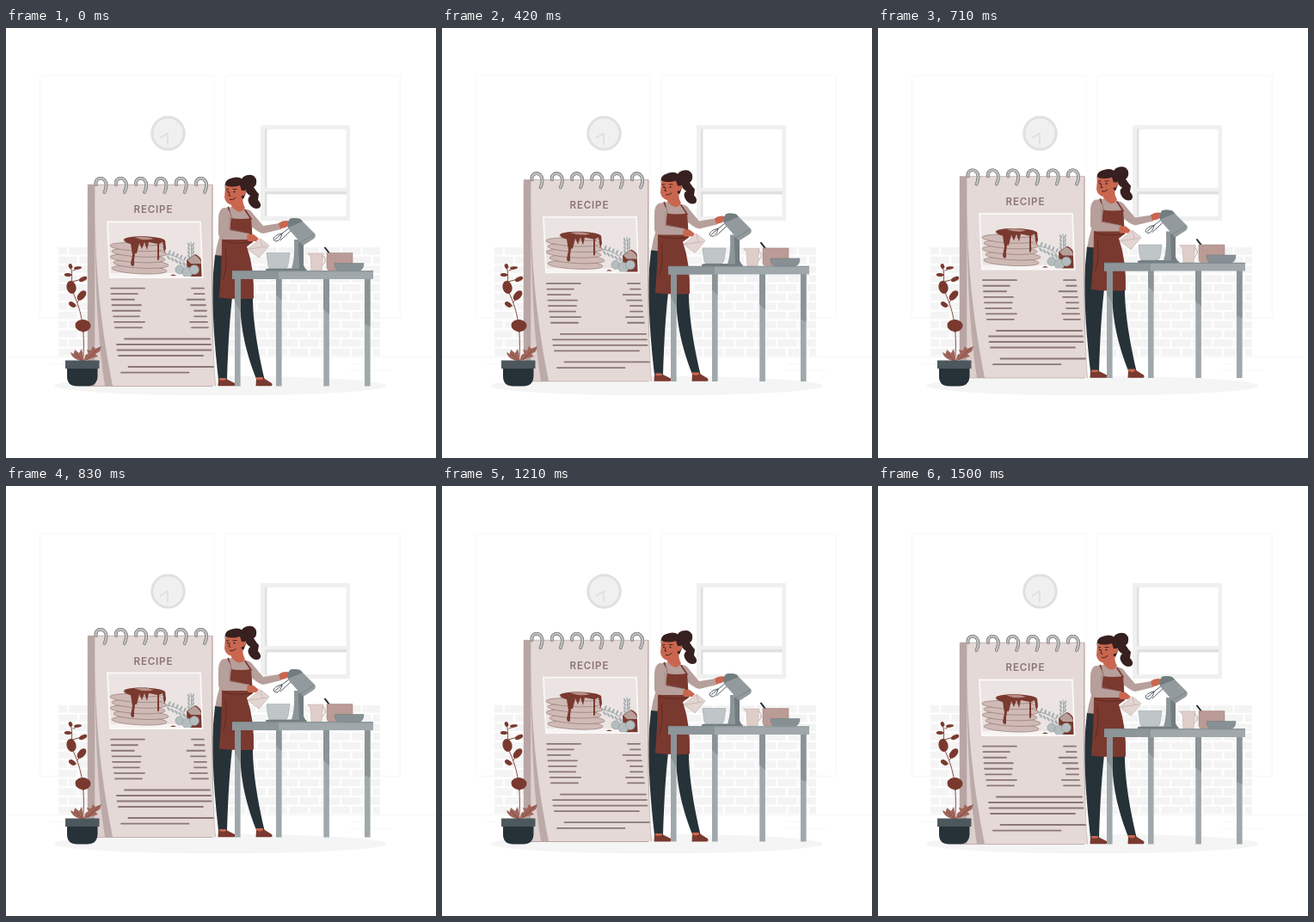
An HTML page that plays this animation: 500 px wide and 500 px high, repeating every 1.54 s.

```html
<!DOCTYPE html>
<html lang="en">
<head>
<meta charset="utf-8">
<title>Recipe kitchen</title>
<style>
  html, body { margin: 0; height: 100%; overflow: hidden; background: #fff; }
  svg { display: block; width: 100vw; height: 100vh; }
  .brown { fill: #7a392f; }
  .skin { fill: #c9664f; }
  .dark { fill: #263238; }
  .hair { fill: #37201f; }
  .knit { fill: #b79f9b; }
  .line { fill: none; stroke-linecap: round; stroke-linejoin: round; }
</style>
</head>
<body>
<svg viewBox="0 0 500 500">
  <defs>
    <pattern id="bricks" x="61" y="255" width="24.4" height="21.4" patternUnits="userSpaceOnUse">
      <path fill="#f4f4f4" d="M0 0h9.5v8.6H0zM12 0h12.4v8.6H12zM0 10.7h21.9v8.6H0z"/>
      <path fill="#f4f4f4" d="M9 0h1v8.6H9z"/>
    </pattern>
    <g id="ring" class="line">
      <path id="wire" d="M-5.7 182C-7.5 172.500 6.300 172 6.300 182.500Q6.300 187 4.200 191" stroke="#858585" stroke-width="3.600"/>
      <use href="#wire"/>
      <path d="M-5.700 182C-7.500 172.500 6.300 172 6.300 182.500Q6.300 187 4.200 191" stroke="#c4c4c4" stroke-width="2"/>
    </g>
    <clipPath id="photo"><path d="M118 225.500H226L228.500 290H121z"/></clipPath>
  </defs>

  <!-- room -->
  <g fill="none" stroke="#f3f3f3" stroke-width=".7">
    <rect x="39.300" y="55.300" width="203" height="282" rx="1.500"/>
    <rect x="255.300" y="55.300" width="203" height="282" rx="1.500"/>
    <path d="M0 382.500H500M400 398.300H448M402 390.300H418M52 390.300H67"/>
  </g>
  <path fill="url(#bricks)" d="M61 255H435V382H61z"/>
  <circle cx="188.500" cy="122.500" r="18.700" fill="#f0f0f0" stroke="#e0e0e0" stroke-width="3"/>
  <path class="line" stroke="#dedede" stroke-width="1.600" d="M188 135V122.500L179.500 127.500"/>
  <path fill="#f0f0f0" d="M296 113H400V224H296z"/>
  <path fill="#e0e0e0" d="M301 117.500H304V186H301zM301 190H396V193.500H304V219H301z"/>
  <path fill="#fff" d="M303.500 118H395.500V186H303.500zM303.500 193.500H395.500V219H303.500z"/>
  <ellipse cx="249.500" cy="416" rx="193.500" ry="11.300" fill="#f5f5f5"/>

  <g id="float">
    <!-- notepad -->
    <path fill="#dfd2d0" stroke="#8d6c67" stroke-width=".6" d="M95.300 182.300H240V416.300H95.300z"/>
    <path fill="#b8a6a4" d="M95.300 182.300H103.500V416H95.300z"/>
    <path fill="#ddcfcd" d="M103.500 240Q106 350 115 416H103.500z"/>
    <path fill="#bbaaa8" d="M103.300 182.500C103 290 106 360 115 416H125L110 250z"/>
    <path fill="#e4d9d7" d="M103.500 182.500H239.700C238.800 300 239.500 360 243.500 416H124C113 360 102 290 103.500 182.500z"/>
    <path class="line" stroke="#a98f8b" stroke-width=".5" d="M239.800 182.500C239 300 239.500 360 243.500 416"/>
    <g id="rings"></g>
    <text x="171.400" y="215.500" text-anchor="middle" font-family="Inter, sans-serif" font-size="11.600" font-weight="600" letter-spacing=".8" fill="#8b7471">RECIPE</text>
    <path id="rows" class="line" stroke="#8b7775" stroke-width="1.800"/>

    <!-- photo card -->
    <g clip-path="url(#photo)">
      <path fill="#ebe4e2" d="M117 224H230V292H117z"/>
      <path fill="#f7f4f3" d="M120 285H230V291H120z"/>
      <g id="pancakes" fill="#d0bab6" stroke="#927b77" stroke-width=".7"></g>
      <path class="brown" d="M137 246C140 241 178 241 185 247L186 256L184 262L182 249L178 251V263Q179 271 176 270V251L166 249L164 258L161 249L158 257L155 250L152 262H150L149 270V276Q146 279 145 274L147 264L145 251Q139 250 137 246z"/>
      <path fill="#b88f87" d="M149 243.500Q163 241.500 172 245Q161 248 149 243.500z"/>
      <path class="line" stroke="#9aa4a6" d="M186 263Q202 264 211 277M215 249Q217 263 213 276"/>
      <g id="sprigs" fill="#a7b1b3"></g>
      <path class="brown" d="M210 270L220 263Q227 266 229 274V290H211z"/>
      <path fill="#b7a09b" d="M211 270L219 264Q226 267 227 274L215 274z"/>
      <g stroke="#7f898c" stroke-width=".5" fill="#b4bcbe">
        <circle cx="202" cy="281" r="5"/><circle cx="211" cy="284" r="6"/><circle cx="219" cy="281" r="5.500"/>
      </g>
      <path class="brown" d="M191 288Q194 285 198 288zM222 288L229 282V288z"/>
    </g>
    <path fill="none" stroke="#faf8f7" stroke-width="1.800" d="M118 225.500H226L228.500 290H121z"/>

    <!-- cook -->
    <path class="knit" d="M252 210Q264 205 282 212L288 222L283 252L262 268L243 266Q245 252 249 240z"/>
    <path class="dark" d="M243 264L263 266L287 306C286 340 294 380 300.500 408H291C281 382 273 355 272 318L263 313C259 350 258 380 257 409H247C243 371 239 332 241 285z"/>
    <path class="skin" d="M248 407H256V411H248zM291 406H299V411H291z"/>
    <path class="brown" d="M247 408.500Q252 411 257 408.500L266 413Q267 416 265 416.300H246.500zM291 408Q295 411 300 407.500L309 413Q310.500 416 308 416.300H290.500z"/>
    <path class="knit" d="M277 211Q284 210 288 217L299 230L318 227L320 234L299 239Q291 237 282 227z"/>
    <path class="skin" d="M317 227Q322 223 329 224.500L331 228L325 232L319 233.500z"/>
    <path class="brown" d="M261 221Q273 223 285 221L287 249L280 254Q289 280 288 314.500Q268 316 248 313.500Q251 275 251 246L260 240z"/>
    <path class="line" stroke="#7a392f" stroke-width="1.700" d="M258.500 208.500L262 222M278 211.500L285 222"/>
    <path class="line" stroke="#562820" stroke-width=".8" d="M253 248Q267 252 286 249M255 257Q258 275 253 292"/>
    <path fill="#e3d5d2" stroke="#b9a5a1" stroke-width=".6" d="M281 257L296 245L306 253L294 267z"/>
    <path class="line" stroke="#b9a5a1" stroke-width=".6" d="M283 257L303 254M296 246L298 254"/>
    <path class="knit" d="M253 209Q247 211 247 222V240Q248 246 256 246L282 246L283 239L260 235L262 220Q260 209 253 209z"/>
    <path class="line" stroke="#947975" stroke-width=".6" d="M260 220V234L281 239"/>
    <path class="skin" d="M281 240L288 240L294 245L291 248H282Q279 246 281 240z"/>
    <path class="skin" d="M263 198L276 193Q274 203 278 209Q272 219 262 207z"/>
    <path class="hair" d="M274 185Q271 174 279 171.500Q288 169 291 176Q292 183 288 185Q291 190 294 193L293 200Q298 205 295 209Q289 212 284 206Q279 199 284 195Q278 192 279 186z"/>
    <path class="hair" d="M256 182Q260 174 270 174Q281 177 281 187L276 199Q269 192 256 182z"/>
    <path class="skin" d="M255 184Q265 178 275 184L277 188Q280 187 279 192Q277 196 274 195Q272 206 263 206Q255 204 254 197z"/>
    <path class="hair" d="M255 187Q253 177 261 175Q273 170 280 181L278 189L274 189L272 183Q263 186 255 183z"/>
    <g class="line" stroke="#37201f" stroke-width=".9">
      <path d="M256 188L259 187.300M264 187.500L268 187.500M260 191L259 195H261M260.500 199.500Q264 200.500 267 197.500"/>
    </g>
    <circle class="hair" cx="258" cy="190.500" r="1"/><circle class="hair" cx="265.500" cy="190.500" r="1"/>

    <!-- mixer and dishes -->
    <path fill="#737c80" d="M302 281Q302 279.500 306 279.500H346Q350 279.500 350 282.500H302z"/>
    <path fill="#8c9699" d="M335 246H346V276L348 280H332Q336 268 335 246z"/>
    <path fill="#737c80" d="M340 249H346V276L348 280H341z"/>
    <path fill="#c0c5c7" stroke="#929a9d" stroke-width=".5" d="M303 261.500H330L328 276Q327 279.500 323 279.500H309Q305 279.500 304.500 275z"/>
    <g class="line" stroke="#3d484d" stroke-width=".9">
      <path d="M330 232L321 239C314 240 309 245 312 247C316 250 320 245 321 239M321 239L313 246M333 234L319 247"/>
    </g>
    <path fill="#929a9d" d="M330 222Q334 220 342 222L359 239Q361 242 358 245L347 252Q344 253 342 249L328 233Q326 229 330 222z"/>
    <path fill="#737c80" d="M330 222Q334 220 342 222L345 225L328 232Q326 228 330 222z"/>
    <path class="line" stroke="#747d80" stroke-width=".7" d="M343 249L358 240"/>
    <path fill="#dfcdc9" stroke="#bea9a5" stroke-width=".5" d="M350.500 262H369L367 282H355L354 266z"/>
    <path class="line" stroke="#bea9a5" stroke-width="1" d="M368 265Q372 266 371 272L368 276"/>
    <path class="line" stroke="#263238" stroke-width="2" d="M371 255.500L376 262"/>
    <path fill="#ba9b95" stroke="#9c7d77" stroke-width=".5" d="M373 261.500H403V282H376Q373 282 373 277z"/>
    <path fill="#879094" stroke="#6d767a" stroke-width=".5" d="M382 273.500H416Q416 282.500 409 282.500H389Q382 282.500 382 273.500z"/>

    <!-- table -->
    <path id="legs" fill="#a0a8ab"/>
    <path fill="#8b9396" d="M266 291H273V330L266 319zM314 291H320.500V316L314 310zM369 291H376V333L369 327zM417 291H423.500V347L417 344z"/>
    <path fill="#a0a8ab" d="M263 282.500H427V292H263z"/>
    <path fill="#8d969a" d="M263 282.500H317V292H263z"/>
    <path fill="#7d878b" d="M263 282.300H427V283.200H263z"/>
  </g>

  <!-- plant -->
  <path class="line" stroke="#7a392f" stroke-width=".9" d="M90 382C92 345 86 325 78 308C74 296 79 290 75 277M76 287L70 288M77 295L88 292M78 282L85 279M83 319L88 311M82 323L76 321"/>
  <g id="leaves" class="brown"></g>
  <path fill="#9e655b" d="M86 387Q76 384 75 377L79 379L80 374L85 378L88 373L91 387zM91 387Q91 378 96 379L94 374L99 375L101 370L104 373L111 370L109 376L104 379L107 382L99 384z"/>
  <path class="line" stroke="#7a392f" stroke-width=".6" d="M89 387L79 377M93 387L108 372"/>
  <path class="dark" d="M71 395H106.500V405Q106 416.500 94 416.500H83Q71 416.500 71 405z"/>
  <path fill="#4c585d" d="M69 386.500H108.500V396H69z"/>
</svg>
<script>
  const el = id => document.getElementById(id);
  const repeat = (list, draw) => list.map(draw).join('');
  const ellipse = ([x, y, rx, ry, turn]) =>
    `<ellipse cx="${x}" cy="${y}" rx="${rx}" ry="${ry}" transform="rotate(${turn} ${x} ${y})"/>`;

  el('rings').innerHTML = repeat([0, 1, 2, 3, 4, 5], i =>
    `<use href="#ring" x="${110.3 + i * 23.3}"/>`);

  // Ingredient rows: left start, left end, right start, right end
  const ingredients = [
    [122, 161, 216, 230], [122.5, 153, 219, 230.5], [123, 149, 210.5, 231], [123.5, 157, 215, 232],
    [124, 156, 219, 233], [125, 155, 219, 233], [126, 161, 214, 234], [127, 158, 216, 235]
  ];
  const steps = [
    [138, 237, 361.5], [129, 238, 368], [129.5, 238.5, 374.5], [131, 229, 381],
    [142.5, 241, 394], [134, 212.5, 400.7]
  ];
  el('rows').setAttribute('d',
    repeat(ingredients, ([a, b, c, d], i) => {
      const y = 302.7 + i * 6.52;
      return `M${a} ${y}H${b}M${c} ${y}H${d}`;
    }) + repeat(steps, ([a, b, y]) => `M${a} ${y}H${b}`));

  el('pancakes').innerHTML = repeat([0, 1, 2, 3, 4, 5], i => {
    const y = 281 - i * 6.6, x = [155, 157, 153, 155, 153, 161][i];
    return ellipse([x, y, i == 5 ? 24 : 32, 4.8, 3]);
  });
  el('sprigs').innerHTML = repeat([0, 1, 2, 3, 4], i =>
    ellipse([190 + i * 4.5, 261 + i * 1.8, 1.2, 3, 25]) +
    ellipse([189 + i * 4.5, 267 + i * 2, 1.2, 3, -35]) +
    ellipse([212.5, 252 + i * 4.5, 1.2, 2.6, -25]) +
    ellipse([217.5, 252 + i * 4.5, 1.2, 2.6, 25]));
  el('legs').setAttribute('d', repeat([266, 314, 369.3, 417], x => `M${x} 290h6.600V416.500h-6.600z`));
  el('leaves').innerHTML = repeat([
    [75, 277, 2.2, 3, -20], [83.500, 279, 4.500, 1.700, -5], [72, 287, 4.300, 1.900, 5],
    [89.500, 292, 5, 2.400, -25], [76, 301.500, 5.500, 7.500, -15], [88, 311, 4, 6.800, 40],
    [77, 321.500, 4.500, 2.700, 35], [89.500, 346, 9, 7, 5]
  ], ellipse) + '<path d="M81 348L90 354L97 348z"/>';

  // Linear rise and fall of 10 units
  const float = el('float');
  function frame(now) {
    const phase = ((now % 1540 + 35) % 1500) / 750;
    const lift = 10 * Math.min(phase, 2 - phase);
    float.setAttribute('transform', `translate(0 ${0.47 - lift})`);
    requestAnimationFrame(frame);
  }
  frame(performance.now());
</script>
</body>
</html>
```
